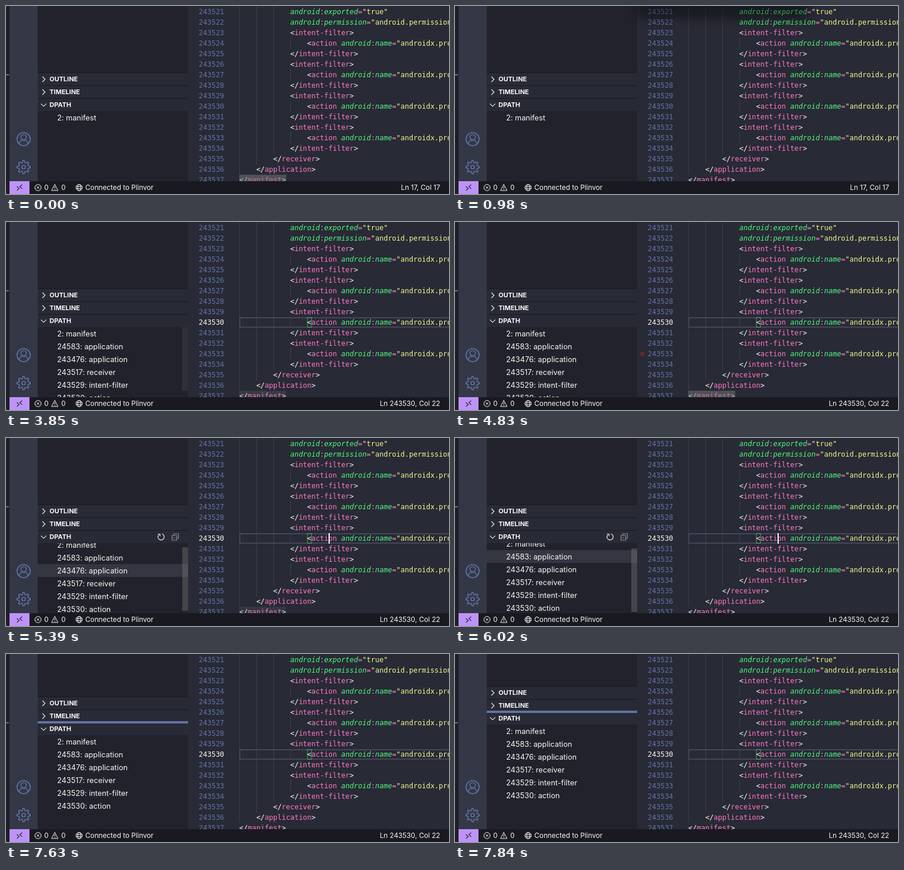
An HTML page that plays this animation: 754 by 322 pixels, repeating every 8000 ms.

```html
<!DOCTYPE html>
<html lang="en">
<head>
<meta charset="utf-8">
<title>Editor breadcrumb</title>
<style>
html, body { margin: 0; width: 100%; height: 100%; overflow: hidden; background: #191a21; }
svg { display: block; width: 754px; height: 322px; }
text { white-space: pre; }
.code { font: 12px "DejaVu Sans Mono", monospace; fill: #f8f8f2; }
.num { fill: #6272a4; }
.tag, .op { fill: #ff79c6; }
.attr { fill: #50fa7b; font-style: italic; }
.str { fill: #f1fa8c; }
.head { font: bold 11px Inter, sans-serif; fill: #f8f8f2; }
.row { font: 12.75px Inter, sans-serif; fill: #f8f8f2; }
.status { font: 11.75px Inter, sans-serif; fill: #f8f8f2; }
.line { fill: none; stroke: #f8f8f2; }
.muted { fill: none; stroke: #6272a4; stroke-width: 1.6; }
</style>
</head>
<body>
<svg viewBox="0 0 754 322">
  <defs>
    <clipPath id="listClip"><rect id="listArea" x="54" y="180" width="256" height="120"/></clipPath>
    <clipPath id="editorClip"><rect x="310" width="444" height="300"/></clipPath>
    <filter id="blur" x="-30%" y="-80%" width="160%" height="260%"><feGaussianBlur stdDeviation="9"/></filter>
  </defs>
  <rect width="754" height="322" fill="#191a21"/>
  <rect width="6" height="322" fill="#1e1f29"/>
  <rect id="mark" y="117" width="5" height="1.4"/>
  <rect x="6" width="48" height="300" fill="#343746"/>
  <rect x="54" width="256" height="300" fill="#21222c"/>
  <rect x="310" width="444" height="300" fill="#282a36"/>

  <g class="muted">
    <circle cx="30" cy="228" r="11.2"/>
    <circle cx="30" cy="224.8" r="4.6"/>
    <path d="M22.3 236c.7-8.4 14.7-8.4 15.4 0"/>
    <g id="gear" transform="translate(30 276)"><circle r="3"/></g>
  </g>

  <g id="editor" clip-path="url(#editorClip)">
    <g id="guides" fill="#fff" fill-opacity=".1"></g>
    <g id="current">
      <rect x="398" y="164" width="360" height="16" fill="none" stroke="#44475a" stroke-width="2"/>
      <rect x="513" y="163.5" width="7" height="17" fill="none" stroke="#50a068"/>
    </g>
    <g id="lines" class="code"></g>
    <rect id="caret" x="549" y="163" width="2" height="18" fill="#f8f8f2"/>
    <circle id="dot" cx="319" cy="226" r="4" fill="#5c2833"/>
    <rect id="hbar" x="397" y="289" width="80" height="11" fill="#797979" fill-opacity=".5"/>
  </g>

  <g id="list" clip-path="url(#listClip)">
    <rect id="hover" x="54" width="256" height="22" fill="#343642"/>
    <g id="rows" class="row"></g>
  </g>
  <rect id="vbar" x="300" width="10" height="109" fill="#797979" fill-opacity=".4"/>

  <g id="heads" class="head">
    <rect x="54" y="114" width="256" height="66" fill="#282a36"/>
    <path d="M54 114.5h256M54 136.5h256M54 158.5h256" stroke="#191a21"/>
    <path class="line" stroke-width="1.1" d="M62 121l4.5 4.5-4.5 4.5M62 143l4.5 4.5-4.5 4.5M59.5 167.3l4.5 4.5 4.5-4.5"/>
    <text x="74" y="129.3">OUTLINE</text>
    <text x="74" y="151.3">TIMELINE</text>
    <text x="74" y="173.3">DPATH</text>
    <g id="actions" class="line" stroke-width="1.2">
      <path d="M260 165.8a5.3 5.3 0 1 0 5.5-1.5M258.5 164.5h3.5v3.5"/>
      <path stroke="#8b8c95" d="M285.5 167v-3h8v8h-3M282.5 167h8v8h-8zM284.5 171h4"/>
    </g>
    <rect id="sash" x="54" y="156" width="256" height="4" fill="#6272a4"/>
  </g>

  <rect id="shadow" x="308" y="-40" width="296" height="62" rx="16" fill="#000" filter="url(#blur)"/>

  <rect x="6" y="300" width="748" height="22" fill="#191a21"/>
  <rect x="6" y="300" width="34" height="22" fill="#bd93f9"/>
  <path d="M18.5 309l4 3.5-4 3.5M27.5 306l-4 3.5 4 3.5" fill="none" stroke="#282a36" stroke-width="1.1"/>
  <g class="line">
    <circle cx="54.5" cy="311" r="5.3"/>
    <path d="M52.3 308.8l4.4 4.4M56.7 308.8l-4.4 4.4"/>
    <path d="M83 305.5l5.5 10.5h-11zM83 309v3.5M83 313.5v1.2"/>
    <circle cx="124.5" cy="311" r="5.3"/>
    <ellipse cx="124.5" cy="311" rx="2.4" ry="5.3"/>
    <path d="M119.7 309.2h9.6M119.7 312.8h9.6"/>
  </g>
  <g class="status">
    <text x="65" y="315.2">0</text>
    <text x="94" y="315.2">0</text>
    <text x="135" y="315.2">Connected to Plinvor</text>
    <text id="position" x="739" y="315.2" text-anchor="end"></text>
  </g>
</svg>
<script>
const LOOP = 8000, CHAR = 7.2246, LEFT = 397, ROW = 18, FIRST = 243521;
const $ = id => document.getElementById(id);

function add(parent, name, attrs, text) {
  const node = document.createElementNS('http://www.w3.org/2000/svg', name);
  for (const key in attrs) node.setAttribute(key, attrs[key]);
  if (text !== undefined) node.textContent = text;
  parent.append(node);
  return node;
}

// Code tokens are [class, text] pairs
const open = tag => [['', '<'], ['tag', tag], ['', '>']];
const close = tag => [['', '</'], ['tag', tag], ['', '>']];
const attr = (name, value) =>
  [['attr', 'android'], ['op', ':'], ['attr', name], ['op', '='], ['str', `"${value}"`]];
const action = [['', '<'], ['tag', 'action'], ['', '\u00a0'], ...attr('name', 'androidx.profile')];
const filter = [[12, open('intent-filter')], [16, action], [12, close('intent-filter')]];
const source = [
  [12, attr('exported', 'true')],
  [12, attr('permission', 'android.permission')],
  ...filter, ...filter, ...filter, ...filter,
  [8, close('receiver')], [4, close('application')], [0, close('manifest')]
];

const numbers = source.map(([indent, tokens], i) => {
  const y = 14.3 + i * ROW;
  const number = add($('lines'), 'text', { class: 'num', x: 328, y }, FIRST + i);
  const line = add($('lines'), 'text', { x: LEFT + indent * CHAR, y });
  for (const [cls, text] of tokens) add(line, 'tspan', { class: cls }, text);
  for (let col = 0; col < indent; col += 4)
    add($('guides'), 'rect', { x: Math.round(LEFT + col * CHAR), y: 1 + i * ROW, width: 1, height: ROW });
  return number;
});

const path = ['2: manifest', '24583: application', '243476: application',
  '243517: receiver', '243529: intent-filter', '243530: action'];
const rows = path.map((text, i) => add($('rows'), 'text', { x: 87, y: 196 + i * 22 }, text));

const teeth = Array.from({ length: 32 }, (_, i) => {
  const a = (i - 0.5) * Math.PI / 16, r = i % 4 < 2 ? 11.3 : 8;
  return `${(r * Math.cos(a)).toFixed(2)} ${(r * Math.sin(a)).toFixed(2)}`;
});
add($('gear'), 'path', { d: `M${teeth.join('L')}Z` });

const between = (t, a, b) => t >= a && t < b;
const show = (id, on) => $(id).setAttribute('opacity', Number(on));

// Linear interpolation through [time, value] points
function track(t, points) {
  if (t <= points[0][0]) return points[0][1];
  for (let i = 1; i < points.length; i++) {
    const [t0, v0] = points[i - 1], [t1, v1] = points[i];
    if (t < t1) return v0 + (v1 - v0) * (t - t0) / (t1 - t0);
  }
  return points[points.length - 1][1];
}

const blinks = [2870, 3360, 3920, 4480, 4970, 5530, 6020, 6580, 7000, 7560];

function render(time) {
  const t = Math.floor(time / 70 + 1e-6) * 70;
  const clicked = t >= 2870, listed = t >= 3850;

  $('mark').setAttribute('fill', clicked ? '#8c8d94' : '#a585dc');
  show('current', clicked);
  numbers[9].style.fill = clicked ? '#f8f8f2' : '';
  $('position').textContent = clicked ? 'Ln 243530, Col 22' : 'Ln 17, Col 17';
  show('caret', blinks.filter(b => b <= t).length % 2);
  show('dot', between(t, 4760, 4900));

  show('hbar', track(t, [[140, 1], [980, 0], [1680, 0], [1820, 1], [2240, 1], [2870, 0.15],
    [3780, 0.15], [3990, 1], [4830, 1], [5670, 0]]));
  show('shadow', track(t, [[210, 0], [630, 0.38], [1610, 0.38], [1890, 0]]));

  const lift = Math.round(track(t, [[7420, 0], [7490, 11], [7560, 26], [7630, 41], [7700, 49], [7770, 55], [7840, 59]]));
  const scroll = Math.max(0, Math.round(track(t, [[5110, 0], [5460, 10]])) - lift);
  rows.forEach((row, i) => {
    row.setAttribute('y', 196 + i * 22 - lift - scroll);
    row.setAttribute('opacity', Number(i === 0 || listed));
  });
  $('listArea').setAttribute('y', 180 - lift);
  $('listArea').setAttribute('height', 120 + lift);
  $('heads').setAttribute('transform', `translate(0 ${-lift})`);

  const hoverRow = t < 5950 ? 2 : 1;
  $('hover').setAttribute('y', 180 + hoverRow * 22 - scroll);
  show('hover', between(t, 4970, 6090));
  show('actions', between(t, 4970, 7140));
  show('sash', t >= 7420);

  $('vbar').setAttribute('y', 180 + scroll * 0.9);
  const fade = [6370, 6580, 6790].filter(step => step <= t).length / 3;
  show('vbar', between(t, 4970, 6790) ? 1 - fade : between(t, 3850, 4690) ? 0.4 : 0);
}

function tick() {
  render(performance.now() % LOOP);
  requestAnimationFrame(tick);
}
tick();
</script>
</body>
</html>
```
